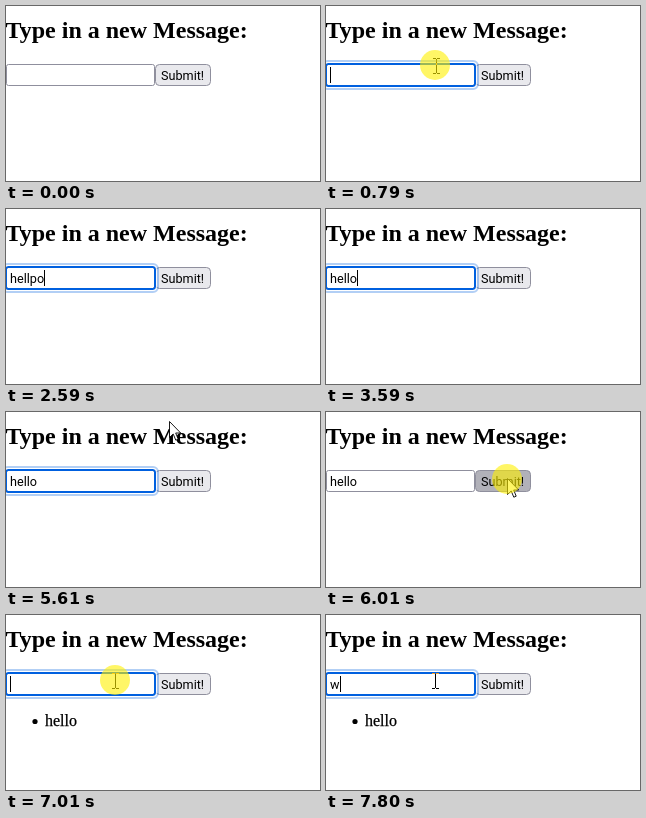
Recreate the animation shown at these times as an HTML page. Size 314 by 175 pixels, loop 8000 ms.

```html
<!DOCTYPE html>
<html lang="en">
<head>
<meta charset="utf-8">
<title>Message form</title>
<style>
  html, body { margin: 0; width: 100%; height: 100%; overflow: hidden; background: #fff; }
  svg { display: block; width: 100%; height: 100%; }
  text { white-space: pre; }
  .serif { font: 16px "Liberation Serif", serif; }
  .title { font-size: 24px; font-weight: bold; }
  .item { stroke: #000; stroke-width: .25; }
  .control { font: 12.65px Roboto, sans-serif; }
  .box { fill: #fff; stroke: #8f8f9d; }
  .up { fill: #e9e9ed; }
  .hover { fill: #d0d0d7; }
  .down { fill: #b1b1b9; }
  .ring { fill: none; stroke: #0060df; stroke-width: 2; }
  .gap { stroke: #fff; stroke-width: 1; stroke-opacity: .8; }
  .glow { stroke-opacity: .3; }
  .beam { fill: none; stroke: #fff; mix-blend-mode: difference; }
  .arrow { fill: #fff; stroke: #000; stroke-width: .9; }
</style>
</head>
<body>
<svg viewBox="0 0 314 175">
  <rect width="314" height="175" fill="#fff"/>
  <text class="serif title" x="-.5" y="32">Type in a new Message:</text>

  <rect class="box" x=".5" y="58.5" width="148" height="21" rx="2"/>
  <rect id="button" class="box" x="149.5" y="58.5" width="55" height="21" rx="4"/>
  <text class="control" x="155" y="74">Submit!</text>
  <g id="focus">
    <rect class="ring" x="0" y="58" width="149" height="22" rx="2"/>
    <rect class="ring gap" x="-1.5" y="56.5" width="152" height="25" rx="3.5"/>
    <rect class="ring glow" x="-3" y="55" width="155" height="28" rx="5"/>
  </g>
  <text id="typed" class="control" x="4" y="74"></text>
  <rect id="caret" y="61" width="1" height="16"/>

  <g id="item">
    <circle cx="29" cy="106.5" r="2.6"/>
    <text class="serif item" x="39" y="111">hello</text>
  </g>

  <path id="beam" class="beam" d="M-3 -7.5H0M1 -7.5H4M.5 -7V7M-3 7.5H0M1 7.5H4"/>
  <path id="arrow" class="arrow" d="M.5 .5V16.5L4.2 13L6.8 19.2L9.2 18.2L6.7 12H11.7Z"/>
  <circle id="press" r="15" fill="#fff000" fill-opacity=".6"/>
</svg>
<script>
const LOOP = 8000;
const START = { text: '', focus: false, caret: false, item: false, button: 'up',
                beam: null, arrow: null, press: null };
const ADVANCE = { h: 7, e: 7, l: 3, o: 7, p: 7, w: 10 };

const type = text => ({ text, caret: true });

// Each entry changes part of the state from its time on.
const events = [
  [570, { arrow: [120, 92] }],
  [790, { arrow: null, beam: [110, 60], press: [109, 59], focus: true, caret: true }],
  [990, { press: null }],
  [1190, { beam: null }],
  [1390, { caret: false }],
  [1790, type('h')],
  [1990, type('he')],
  [2190, type('hel')],
  [2390, type('hell')],
  [2590, type('hellpo')],
  [2990, type('hellp')],
  [3190, type('hell')],
  [3590, type('hello')],
  [4190, { caret: false }],
  [4610, { caret: true }],
  [5210, { caret: false }],
  [5610, { arrow: [163, 9] }],
  [5810, { arrow: [181, 66], button: 'hover' }],
  [6010, { press: [181, 67], button: 'down', focus: false }],
  [6200, { press: null, button: 'hover', text: '', item: true }],
  [6400, { arrow: [158, 91], button: 'up' }],
  [6610, { arrow: [128, 84] }],
  [6810, { arrow: null, beam: [111, 69] }],
  [7010, { beam: [109, 66], press: [109, 65], focus: true, caret: true }],
  [7200, { press: null }],
  [7600, { caret: false }],
  [7800, type('w')]
];

const el = id => document.getElementById(id);
const show = (id, on) => el(id).setAttribute('visibility', on ? 'visible' : 'hidden');

function place(id, point) {
  show(id, point);
  if (point) el(id).setAttribute('transform', `translate(${point})`);
}

function draw(time) {
  const state = { ...START };
  for (const [at, change] of events) if (at <= time) Object.assign(state, change);

  show('focus', state.focus);
  show('item', state.item);
  show('caret', state.focus && state.caret);
  el('caret').setAttribute('x', [...state.text].reduce((x, c) => x + ADVANCE[c], 4));
  el('typed').textContent = state.text;
  el('button').setAttribute('class', `box ${state.button}`);
  ['beam', 'arrow', 'press'].forEach(id => place(id, state[id]));
}

const begin = performance.now();
function tick() {
  draw((performance.now() - begin) % LOOP);
  requestAnimationFrame(tick);
}
tick();
</script>
</body>
</html>
```
